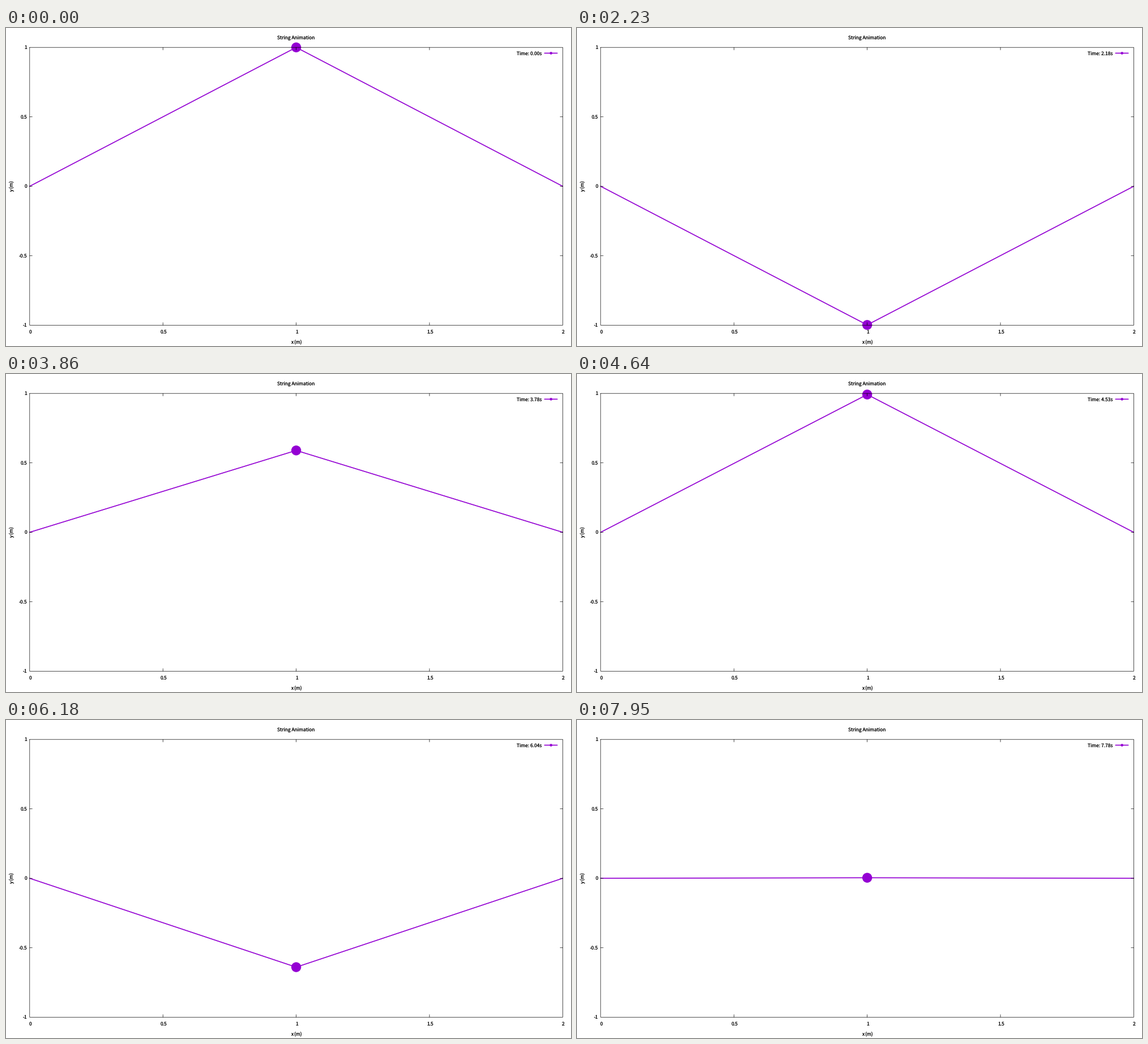
Write a matplotlib script that moves like this. It is 998 px wide and 561 px high and loops after 8000 ms.

```python
import math

import matplotlib.pyplot as plt
from matplotlib.animation import FuncAnimation
from matplotlib.patches import Circle

W, H = 998, 561
LOOP, STEP = 8000, 20            # ms
FPS = 22                         # picture changes per second
DT = 2 / 45                      # simulated seconds per picture
OMEGA = math.sqrt(2)

LEFT, RIGHT, TOP, BOTTOM = 41.8, 983.4, 34.2, 524.3
MID_X, MID_Y = (LEFT + RIGHT) / 2, (TOP + BOTTOM) / 2
AMP = (BOTTOM - TOP) / 2
TICK = 4.6
PURPLE = "#9400d3"

plt.rcParams.update({
    "font.family": "Noto Sans CJK JP",
    "font.size": 8.43,
    "text.hinting": "none",
    "path.snap": False,
})

# At 72 dpi one point is one pixel.
fig = plt.figure(figsize=(W / 72, H / 72), dpi=72, facecolor="white")
ax = fig.add_axes([0, 0, 1, 1])
ax.set_xlim(0, W)
ax.set_ylim(H, 0)
ax.axis("off")


def label(x, y, s, ha="center", **kw):
    return ax.text(x, y, s, ha=ha, va="baseline", color="black", **kw)


def stroke(xs, ys, color="black", lw=0.7, z=5):
    line, = ax.plot(xs, ys, color=color, lw=lw, zorder=z,
                    solid_capstyle="round", solid_joinstyle="round")
    return line


def dot(x, y, r):
    return ax.add_patch(Circle((x, y), r, fc=PURPLE, lw=0, zorder=3))


# Frame, ticks and tick labels
stroke([LEFT, RIGHT, RIGHT, LEFT, LEFT], [TOP, TOP, BOTTOM, BOTTOM, TOP])
for i, name in enumerate(["0", "0.5", "1", "1.5", "2"]):
    x = LEFT + i * (RIGHT - LEFT) / 4
    label(x + 1.2, 539.1, name)
    if 0 < i < 4:
        stroke([x, x], [TOP, TOP + TICK])
        stroke([x, x], [BOTTOM, BOTTOM - TICK])
for i, name in enumerate(["1", "0.5", "0", "-0.5", "-1"]):
    y = TOP + i * AMP / 2
    label(37.2, y + 3.1, name, ha="right")
    if 0 < i < 4:
        stroke([LEFT, LEFT + TICK], [y, y])
        stroke([RIGHT, RIGHT - TICK], [y, y])

label(MID_X, 20.2, "String Animation")
label(MID_X, 556.1, "x (m)")
label(13, MID_Y, "y (m)", rotation=90, rotation_mode="anchor")

# Key
clock = label(946.2, 47.5, "", ha="right")
stroke([951.3, 973.7], [44.4, 44.4], PURPLE, 1.7, 2)
dot(962.7, 44.4, 2.3)

string = stroke([LEFT, MID_X, RIGHT], [MID_Y] * 3, PURPLE, 1.7, 2)
ball = dot(MID_X, MID_Y, 8.7)


def update(frame):
    ms = frame * STEP + STEP / 2
    t = math.floor((ms + 5) * FPS / 1000) * DT
    y = MID_Y - AMP * math.cos(OMEGA * t)
    string.set_ydata([MID_Y, y, MID_Y])
    ball.center = (MID_X, y)
    clock.set_text(f"Time: {t:.2f}s")
    return string, ball, clock


anim = FuncAnimation(fig, update, frames=LOOP // STEP, interval=STEP,
                     init_func=lambda: update(0), repeat=True,
                     repeat_delay=0, blit=False)
plt.show()
```
